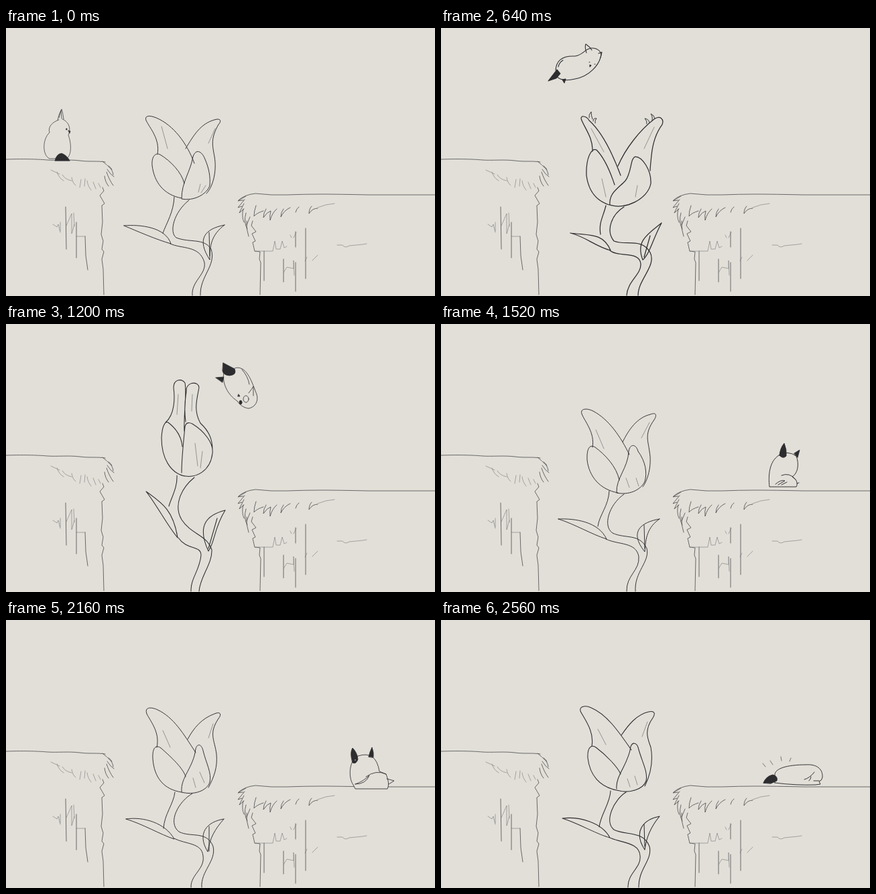
Animation of 640 by 400 pixels, one loop 3.04 s. Source, as an HTML page without scripts:

```html
<!DOCTYPE html>
<html lang="en">
<head>
<meta charset="utf-8">
<title>Leap over the flower</title>
<style>
html, body { margin: 0; width: 100%; height: 100%; overflow: hidden; background: #e2dfd8; }
svg { display: block; width: 100%; height: 100%; fill: none; stroke: #2d2d30; stroke-width: .95; stroke-linecap: round; stroke-linejoin: round; }
.land { stroke: #404043; stroke-width: .75; }
.faint { stroke: #77777a; stroke-width: .6; }
.body { fill: #e2dfd8; }
.dark { fill: #2d2d30; }

/* every part shares one clock; 80 ms per drawing */
.flower, .head, .veins, .stem, .teeth, .bird { animation: 3.04s step-end infinite; }
.flower { animation-name: weight; }
.head { animation-name: head; }
.veins { animation-name: veins; stroke: #606063; stroke-width: .6; }
.stem { animation-name: stem; }
.buds { animation-name: buds; }
.left { animation-name: teeth-left; transform-origin: 203px 90px; }
.right { animation-name: teeth-right; transform-origin: 335px 94px; }
.sit { animation-name: sit; transform-origin: 82px 198px; stroke-width: .7; }
.fly { animation-name: fly; transform-origin: 202px 56px; stroke-width: 1.05; }
.top { animation-name: top; transform-origin: 258px 50px; }
.dive { animation-name: dive; transform-origin: 347px 92px; stroke-width: .8; }
.land-sit { animation-name: land-sit; transform-origin: 511px 245px; }
.turn { animation-name: turn; transform-origin: 545px 251px; stroke-width: .85; }
.lie { animation-name: lie; transform-origin: 530px 246px; }
.puff { animation-name: puff; transform-origin: 522px 232px; stroke-width: .6; }

@keyframes weight {
  0%, 100% { stroke-width: .95; }
  18.42% { stroke-width: 1.25; }
  28.94% { stroke-width: .8; }
  36.84% { stroke-width: 1.05; }
  44.73% { stroke-width: .95; }
  78.94% { stroke-width: 1.05; }
}
@keyframes head {
  0%, 5.26% { animation-timing-function: steps(6); d: path("M226 188C230 166 215 150 209 138C206 129 217 131 224 134C250 145 270 172 281 202M268 180C280 160 290 143 311 137C320 134 322 139 317 144C305 165 308 175 311 192C315 215 308 238 299 247M262 254C235 249 221 230 218 205C217 190 224 186 230 189C245 198 262 215 266 232M262 254C262 230 275 215 279 192C283 180 292 183 297 196C303 210 305 222 304 235C300 248 280 259 262 255"); }
  21.05% { animation-timing-function: steps(4); d: path("M226 184C227 165 215 150 210 138C206 129 217 131 221 138C240 155 255 185 268 220M264 206C275 180 297 152 318 136C327 130 333 136 330 144C318 160 315 180 314 190C313 200 312 208 312 213M251 264C232 258 220 243 217 220C216 195 224 178 232 182C245 195 255 222 259 234M252 264C250 246 266 238 275 228C285 215 282 194 290 192C300 192 314 212 313 232C309 255 275 272 252 264"); }
  31.57% { animation-timing-function: steps(3); d: path("M213 146C210 125 197 108 191 95C188 87 198 87 203 92C235 112 250 145 268 170M292 148C300 130 318 106 337 94C344 89 348 96 344 101C333 120 324 145 317 168C312 183 306 190 303 195M258 227C238 222 215 185 210 160C207 145 213 143 222 148C242 160 262 190 263 215M262 226C261 195 270 150 280 144C288 140 293 148 295 155C303 180 306 200 303 210C298 225 280 227 262 226"); }
  39.47% { animation-timing-function: steps(2); d: path("M238 147C252 135 252 110 250 95C250 82 262 81 267 88C270 105 265 130 266 160M268 146C264 115 270 105 269 97C272 85 288 86 288 95C284 115 280 130 290 148C303 160 308 172 308 188M266 227C245 222 232 200 232 170C233 150 238 145 242 147C255 157 262 170 263 183M262 222C262 200 264 185 267 153C269 146 274 147 278 149C296 160 310 178 308 193C305 218 285 232 262 226"); }
  44.73%, 60.52% { animation-timing-function: steps(4); d: path("M226 184C230 162 214 145 210 134C207 125 220 126 227 130C250 142 268 168 281 195M271 176C280 158 292 140 312 135C322 131 322 137 318 143C303 164 309 174 311 190C315 212 308 234 301 243M264 252C237 247 221 228 218 203C217 182 224 180 230 184C245 195 262 213 266 233M262 251C261 230 279 215 280 190C282 178 291 179 294 190C305 205 308 222 304 235C298 248 280 256 262 252"); }
  71.05%, 78.94% { animation-timing-function: steps(2); d: path("M225 190C230 168 216 152 210 140C206 129 218 130 226 134C250 145 265 170 283 198M271 178C280 161 292 147 311 140C320 136 322 141 317 147C302 170 311 178 314 200C316 220 310 235 302 250M262 257C235 253 221 235 219 207C218 190 224 186 231 191C247 205 265 222 268 234M262 256C260 235 280 220 283 192C286 183 292 186 294 195C299 215 307 228 304 242C300 255 280 262 262 257"); }
  84.21%, 100% { d: path("M225 188C229 166 214 148 208 136C206 127 218 128 224 131C248 141 266 168 284 194M269 172C280 156 292 141 310 137C319 135 320 140 316 146C302 166 309 178 313 190C317 212 312 232 304 248M262 254C237 249 222 232 219 206C218 189 225 186 231 190C247 202 264 220 268 230M262 252C260 232 280 215 283 189C286 181 292 184 294 190C299 210 309 226 306 240C302 252 282 260 262 254"); }
}
@keyframes veins {
  0%, 5.26% { animation-timing-function: steps(6); d: path("M232 147L241 180M312 150L302 172M290 233L287 245M298 235L291 246"); }
  21.05% { animation-timing-function: steps(4); d: path("M224 150L243 185M318 148L303 180M293 235L290 252M240 225L246 252"); }
  31.57% { animation-timing-function: steps(3); d: path("M201 105L228 146M333 106L310 150M286 180L293 210M276 190L273 215"); }
  39.47% { animation-timing-function: steps(2); d: path("M257 105L255 135M278 105L277 130M282 178L286 212M293 190L290 215"); }
  44.73%, 60.52% { animation-timing-function: steps(4); d: path("M231 158L243 186M311 147L299 170M276 230L281 244M291 230L295 242"); }
  71.05%, 78.94% { animation-timing-function: steps(2); d: path("M234 165L245 190M309 155L302 176M279 236L283 250M289 227L296 243"); }
  84.21%, 100% { d: path("M234 163L246 186M308 152L300 174M278 237L282 249M289 233L293 246"); }
}
@keyframes stem {
  0%, 5.26% { animation-timing-function: steps(6); d: path("M251 252C250 275 240 290 234 306M273 257C250 275 243 305 254 313C275 321 295 313 306 330C314 355 289 370 290 399M245 322C262 330 289 324 296 350C299 368 276 378 278 399M176 295C200 293 238 297 246 322C225 316 195 303 176 295M326 294C296 300 284 315 304 346C304 325 306 309 326 294M303 305L304 340"); }
  21.05% { animation-timing-function: steps(4); d: path("M246 265C242 282 235 290 238 308M273 267C255 278 245 302 258 318C275 325 300 313 312 335C322 355 294 375 294 399M252 332C265 343 296 332 298 352C299 368 278 378 277 399M193 306C220 310 242 305 253 332C230 326 215 311 193 306M329 291C308 308 290 318 301 346C311 338 316 315 329 291M312 310L303 342"); }
  31.57% { animation-timing-function: steps(3); d: path("M251 229C257 248 245 265 245 285M279 228C260 250 248 270 260 295C272 320 296 316 303 335C308 360 291 375 288 399M253 312C265 338 290 325 292 352C291 370 277 385 277 399M218 242C224 258 250 275 254 313C235 300 220 275 218 242M328 278C303 284 282 305 303 346C302 325 320 310 328 278M312 290L298 320"); }
  39.47% { animation-timing-function: steps(2); d: path("M255 226C256 245 246 260 243 272M281 229C260 246 250 272 262 292C277 315 299 314 307 337C308 358 289 378 288 399M257 319C270 338 291 330 291 345C289 368 275 380 276 399M209 250C235 268 250 280 256 319C240 300 225 270 209 250M327 278C300 285 284 300 302 339C312 325 310 305 327 278M315 290L302 335"); }
  44.73%, 60.52% { animation-timing-function: steps(4); d: path("M251 249C250 272 236 285 234 302M273 254C250 270 241 302 256 312C275 321 296 312 307 335C312 355 288 370 290 399M246 321C265 330 291 325 295 347C297 368 276 375 277 399M175 291C200 290 235 295 247 321C225 314 200 299 175 291M326 291C298 296 280 310 304 340C305 320 308 303 326 291M303 300L304 335"); }
  71.05%, 78.94% { animation-timing-function: steps(2); d: path("M252 257C250 275 236 290 235 311M278 259C258 270 240 302 258 316C275 325 300 314 309 338C314 360 290 375 292 399M251 326C268 335 292 332 294 352C297 372 275 380 276 399M179 297C205 293 238 303 251 327C230 320 205 305 179 297M325 297C300 301 284 318 301 346C304 325 312 312 325 297M303 308L303 345"); }
  84.21%, 100% { d: path("M253 255C252 275 238 290 236 309M276 257C258 268 243 300 258 313C276 322 302 314 311 338C316 358 294 372 295 399M252 325C270 333 296 332 297 352C299 370 278 378 279 399M181 296C206 293 240 302 252 325C230 319 207 304 181 296M326 293C302 298 286 315 304 343C306 325 312 310 326 293M303 305L304 338"); }
}
@keyframes buds {
  0%, 23.68%, 100% { opacity: 0; }
  18.42% { opacity: 1; }
}
@keyframes teeth-left {
  0%, 39.47%, 100% { opacity: 0; transform: translate(60px, 0) rotate(38deg); }
  23.68% { opacity: 1; transform: translate(13px, 30px) rotate(7deg) scale(.6); animation-timing-function: steps(3); }
  31.57% { opacity: 1; transform: none; animation-timing-function: steps(3); }
}
@keyframes teeth-right {
  0%, 39.47%, 100% { opacity: 0; transform: translate(-60px, 0) rotate(-38deg); }
  23.68% { opacity: 1; transform: translate(-13px, 30px) rotate(-7deg) scale(.6); animation-timing-function: steps(3); }
  31.57% { opacity: 1; transform: none; animation-timing-function: steps(3); }
}
@keyframes sit {
  0% { opacity: 1; transform: none; }
  7.89% { opacity: 1; transform: scale(1.05, .92); }
  10.52% { opacity: 1; transform: scale(1.1, .82); }
  13.15% { opacity: 1; transform: translate(4px, -4px) rotate(8deg) scale(.95, 1.08); }
  15.78%, 100% { opacity: 0; }
}
@keyframes fly {
  0% { opacity: 0; }
  15.78% { opacity: 1; transform: translate(-84px, 66px) rotate(-26deg); }
  18.42% { opacity: 1; transform: translate(-40px, 26px) rotate(-12deg); }
  21.05% { opacity: 1; transform: none; }
  23.68% { opacity: 1; transform: translate(18px, -3px) rotate(8deg); }
  26.31%, 100% { opacity: 0; }
}
@keyframes top {
  0% { opacity: 0; }
  26.31% { opacity: 1; transform: translate(-22px, -2px) rotate(-8deg); }
  28.94% { opacity: 1; transform: translate(-11px, -3px) rotate(-3deg); }
  31.57% { opacity: 1; transform: none; }
  34.21% { opacity: 1; transform: translate(28px, 5px) rotate(18deg); }
  36.84%, 100% { opacity: 0; }
}
@keyframes dive {
  0% { opacity: 0; }
  36.84% { opacity: 1; transform: translate(-28px, -26px) rotate(-18deg); }
  39.47% { opacity: 1; transform: none; }
  42.1% { opacity: 1; transform: translate(46px, 52px) rotate(4deg); }
  44.73% { opacity: 1; transform: translate(105px, 112px) rotate(-8deg); }
  47.36%, 100% { opacity: 0; }
}
@keyframes land-sit {
  0% { opacity: 0; }
  47.36% { opacity: 1; transform: translate(-8px, 0) scale(1.1, .85); }
  49.99% { opacity: 1; transform: none; }
  52.63% { opacity: 1; transform: scale(.99, 1.02); }
  55.26% { opacity: 1; transform: none; }
  63.15% { opacity: 1; transform: scale(1.03, .96); }
  65.78% { opacity: 1; transform: translate(8px, 1px) scale(1.06, .92); }
  68.42%, 100% { opacity: 0; }
}
@keyframes turn {
  0% { opacity: 0; }
  68.42% { opacity: 1; transform: translate(-8px, -1px); }
  71.05% { opacity: 1; transform: none; }
  73.68% { opacity: 1; transform: translate(-4px, -1px) scale(1.06, .82); }
  76.31%, 100% { opacity: 0; }
}
@keyframes lie {
  0% { opacity: 0; }
  76.31% { opacity: 1; transform: scale(.98, 1.08); }
  81.57% { opacity: 1; transform: scale(1.02, .94); }
  84.21%, 100% { opacity: 1; transform: none; }
}
@keyframes puff {
  0% { opacity: 0; }
  81.57% { opacity: 1; transform: scale(.86); }
  84.21%, 100% { opacity: 1; transform: none; }
}
</style>
</head>
<body>
<svg viewBox="0 0 640 400">
  <g class="land">
    <path d="M0 196C30 195 50 196 62 197S95 196 110 198 135 198 148 200M144 199l6 5M151 205q4 1 7 6M153 207q6 4 7 12M151 211q5 8 10 11M150 215q4 12 10 20M147 221q1 9 6 15M144 238l2 5-6 7 7 12-4 3 1 25-2 18 3 10-2 12 3 4-3 11 2 15 1 38"/>
    <path d="M347 257q8-8 25-10 24 3 48 2T470 248 540 249H640M358 251l-12 7 8-1M356 256l-10 12 6-2M355 262l-7 14 7-6M354 270q-3 10 1 20M358 276q-4 14 2 24M359 288q-1 12 3 23M364 282l-5 12M368 288l-2 7 7 9-6 3 5 11-4 2 3 13 8 1-1 11 2 5-1 48"/>
    <path d="M373 265q-3 8-3 16 4-5 14-8M388 270q-4 6-4 13 5-8 11-10-2 7-1 14 3-11 10-17M414 270q-4 5-4 12 5-10 14-14M437 267q-4 3-5 8M456 266q-4 4-4 11 5-8 13-8"/>
    <path d="M89 267L90 330M105 290v53M118 311l1 29 3 21M385 333v44M447 299v75M432 350v43M414 345v34M432 304v23"/>
  </g>
  <g class="faint">
    <path d="M67 212l13 6M76 215q3 9 10 13M84 219q4 7 14 9M98 223q1 8 6 12M112 226l-2 12M118 225l-1 11M121 228q1 8 6 14M130 230l4 10M138 232l3 6"/>
    <path d="M70 293l6 4 2-4 3 12M81 290v13M90 295l8-18v30l4-14M101 276l1 20M105 311h13"/>
    <path d="M371 333h27l3-15 2 12h6l3-12 3 10 4-2M424 309l2 4M433 305l-4 8M414 365l5-8 10 2v-12l1 22M446 348l3-6M457 347l8-8M465 268l12-4 13-2M494 324h8q4 5 10 1l20-2 6-1"/>
  </g>

  <g class="flower">
    <path class="stem"/>
    <path class="veins"/>
    <path class="head"/>
  </g>
  <path class="teeth buds" d="M221 134Q220 129 224 125Q224 131 226 136M227 139Q227 134 232 135Q229 138 230 142M319 135Q318 130 313 128Q316 132 315 138M311 141Q310 136 304 135Q308 139 307 143"/>
  <path class="teeth left" d="M203 90Q209 81 221 81Q212 86 211 94M219 104Q220 94 229 93Q222 98 224 110M233 118Q232 108 238 106Q236 112 238 123M240 128Q240 121 245 119Q243 126 244 133M246 137Q247 130 251 129Q249 134 250 141"/>
  <path class="teeth right" d="M335 94Q329 84 317 82Q325 88 325 96M317 108Q315 92 305 90Q311 98 311 112M308 117Q306 101 298 100Q303 108 302 123M300 127Q299 118 293 117Q297 122 297 132M296 135Q296 128 291 128Q294 133 293 140"/>

  <g class="bird sit">
    <path class="body" d="M79 137C70 140 62 147 65 156C54 166 54 190 65 195H90C99 190 97 170 93 160C98 148 92 139 84 136"/>
    <path d="M77 137Q79 128 83 121Q85 128 86 136M79 134l3-11 1 12"/>
    <path class="dark" d="M73 198Q75 188 83 187Q91 190 95 198ZM93 153l3 1-1 3zM90 150h1v2h-1z"/>
  </g>
  <g class="bird fly">
    <path class="body" d="M171 63C172 48 182 41 200 42C212 40 213 33 223 30C235 29 241 37 238 44C235 55 222 72 200 76C185 80 175 77 171 70"/>
    <path d="M217 37Q214 28 216 24Q222 28 225 33M235 38l5-2-2 8M182 48q-6 4-7 10M221 51h1M229 54h1"/>
    <path class="dark" d="M160 79L173 62 178 68 172 75ZM181 77l5-1-2 6zM222 55l2 1-2 2z"/>
  </g>
  <g class="bird top">
    <path class="body" d="M228 50C226 40 235 34 250 35C262 38 270 38 274 34C290 32 295 40 293 47C290 62 270 68 250 69C240 70 232 67 230 62"/>
    <path d="M273 38Q270 28 274 22Q276 29 281 34M288 35l5-4 1 11"/>
    <circle cx="275.500" cy="50.500" r="1.300"/><circle cx="281" cy="56.500" r="1.300"/>
    <path class="dark" d="M216 51L228 48Q237 50 235 55L233 61H224ZM230 71l6-5 3 4zM273 56l2 1-2 2z"/>
  </g>
  <g class="bird dive">
    <path class="body" d="M325 72C322 88 330 105 345 115C350 122 355 125 362 126C372 124 377 115 374 105C368 90 362 70 350 66C345 64 340 66 338 68"/>
    <path d="M362 103q5-6 7-10v14M352 68q9 10 11 22"/>
    <ellipse cx="358" cy="112" rx="4" ry="5"/>
    <path class="dark" d="M324 58L341 67Q345 76 333 77Q324 76 323 70ZM313 80l12-1-2 8zM347 105l2 3h-3z"/>
    <ellipse class="dark" cx="350" cy="117" rx="2" ry="3"/>
  </g>
  <g class="bird land-sit">
    <path class="body" d="M530 197Q517 188 504 196C490 205 488 225 490 243H530Q533 238 529 232L524 228C532 223 535 210 530 197"/>
    <path d="M508 226Q520 221 529 232M499 239q8-7 14-5l-10 6M508 240l8-4M531 238l3-1"/>
    <path class="dark" d="M505 196Q506 185 512 178Q516 188 515 197Q510 202 505 196ZM527 193l8-5-3 11z"/>
  </g>
  <g class="bird turn">
    <path class="body" d="M525 203C512 208 510 235 518 246L521 252H569Q573 245 567 230L557 226Q552 194 525 203"/>
    <path d="M537 234Q552 223 567 230M521 245Q533 241 542 232Q537 245 521 245M568 237l11 3-8 5"/>
    <path class="dark" d="M515 204Q514 196 517 191Q524 198 525 208Q522 216 517 213ZM541 204Q543 196 546 190Q549 198 548 205Z"/>
    <circle class="body" cx="521" cy="209" r=".8" stroke="none"/>
  </g>
  <g class="bird lie">
    <path class="body" d="M498 243V232C497 222 515 216 545 216C560 215 570 222 569 235Q568 240 564 241L566 245 558 246Q530 247 498 243"/>
    <path d="M542 238Q550 236 557 227M549 240q3-3 3-6M556 240h8"/>
    <path class="dark" d="M481 243Q485 233 495 231Q503 233 501 240L492 244Z"/>
  </g>
  <path class="bird puff" d="M480 214l4 5M491 210l4 6M507 204l1 6M522 206l-2 5"/>
</svg>
</body>
</html>
```
